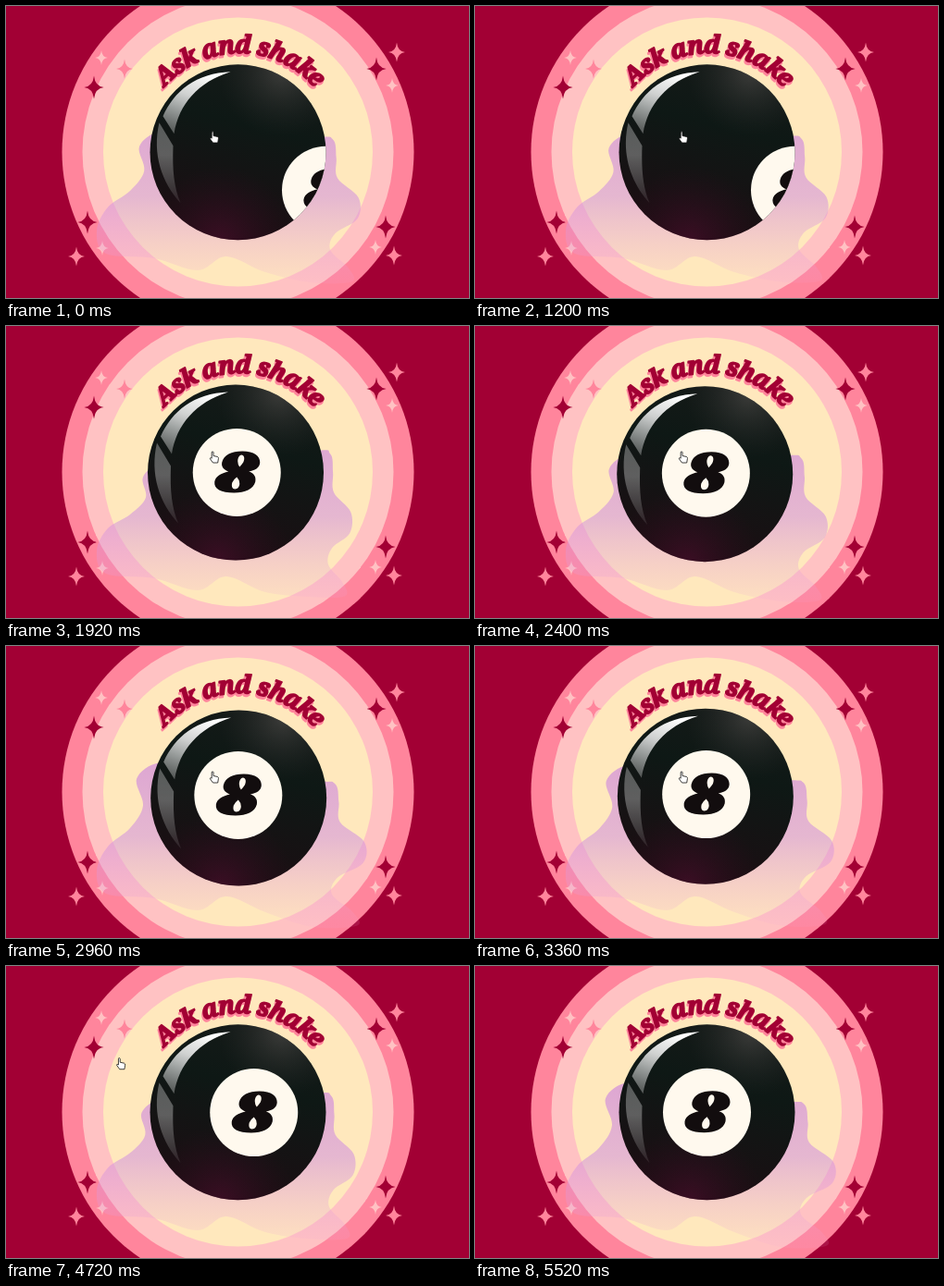
Recreate the animation shown at these times as an HTML page. Size 500x316 px, loop 5.6 s.

```html
<!DOCTYPE html>
<html lang="en">
<head>
<meta charset="utf-8">
<title>Ask and shake</title>
<style>
  html, body { margin: 0; width: 100%; height: 100%; overflow: hidden; background: #a20034; }
  svg { display: block; width: 500px; height: 316px; }
  .title { font: italic 900 27px "Noto Serif", serif; letter-spacing: -1.1px; text-anchor: middle; stroke-width: 1.7; stroke-linejoin: round; }
</style>
</head>
<body>
<svg viewBox="0 0 500 316">
  <defs>
    <linearGradient id="mist" gradientUnits="userSpaceOnUse" x1="0" y1="130" x2="0" y2="300">
      <stop stop-color="#cc84de" stop-opacity=".65"/>
      <stop offset=".45" stop-color="#d08fe0" stop-opacity=".55"/>
      <stop offset="1" stop-color="#f0a4d4" stop-opacity=".12"/>
    </linearGradient>
    <linearGradient id="body" x1=".65" y1="0" x2=".4" y2="1">
      <stop stop-color="#151a18"/><stop offset=".35" stop-color="#0e1815"/><stop offset="1" stop-color="#1c0d12"/>
    </linearGradient>
    <radialGradient id="glow" cx=".4" cy="1" r=".42">
      <stop stop-color="#5a0f36" stop-opacity=".5"/><stop offset="1" stop-color="#3a0c24" stop-opacity="0"/>
    </radialGradient>
    <radialGradient id="sheen" cx=".75" cy=".05" r=".36">
      <stop stop-color="#6a6461" stop-opacity=".45"/><stop offset="1" stop-color="#333" stop-opacity="0"/>
    </radialGradient>
    <linearGradient id="shineTop" x1=".6" y1="0" x2=".2" y2="1">
      <stop stop-color="#fff"/><stop offset=".4" stop-color="#fff" stop-opacity=".8"/><stop offset="1" stop-color="#fff" stop-opacity=".28"/>
    </linearGradient>
    <linearGradient id="shineLow" x1="0" y1="0" x2="0" y2="1">
      <stop stop-color="#fff" stop-opacity=".3"/><stop offset=".4" stop-color="#fff" stop-opacity=".32"/><stop offset="1" stop-color="#fff" stop-opacity=".08"/>
    </linearGradient>
    <clipPath id="ballClip"><circle r="95"/></clipPath>
    <path id="arc" d="M145 158A107 107 0 0 1 359 158"/>
  </defs>

  <circle cx="250.5" cy="158" r="190" fill="#ff859c"/>
  <circle cx="250.5" cy="158" r="168" fill="#ffc2c3"/>
  <circle cx="250.5" cy="158" r="145.5" fill="#ffe8bd"/>
  <g id="stars"></g>
  <path id="smoke" fill="url(#mist)"/>

  <g class="title">
    <text fill="#ff859c" stroke="#ff859c" transform="translate(-1 3)"><textPath href="#arc" startOffset="50%">Ask and shake</textPath></text>
    <text fill="#a20034" stroke="#a20034"><textPath href="#arc" startOffset="50%">Ask and shake</textPath></text>
  </g>

  <g id="ball">
    <circle r="95" fill="url(#body)"/>
    <circle r="95" fill="url(#glow)"/>
    <circle r="95" fill="url(#sheen)"/>
    <g clip-path="url(#ballClip)">
      <g id="eight">
        <circle r="47.5" fill="#fff9ee"/>
        <path fill="#120d0e" d="M6-23C19-23 25-18 25-11C25-5 19-2 13-1C19 1 21 5 20 10C18 18 9 22-3 22C-17 22-25 18-24 10C-23 4-17 1-9-1C-14-3-17-6-16-11C-14-19-6-23 6-23Z"/>
        <path fill="#fff9ee" d="M5-19C8-19 9-15 7-11Q5-8 3-6Q1-9 1-12C1-16 3-19 5-19ZM0 5Q3 8 3 12C3 15 1 18-2 18C-5 18-6 15-5 11Q-3 7 0 5Z"/>
      </g>
    </g>
    <path fill="url(#shineTop)" d="M-8-87C-45-86-69-66-81-39L-69-20C-64-52-43-76-8-87Z"/>
    <path fill="url(#shineLow)" d="M-85-32L-70-7C-71 20-69 38-62 55C-82 33-93 2-85-32Z"/>
  </g>

  <path id="hand" fill="#fff" stroke="#111" stroke-width=".8" stroke-linejoin="round"
    d="M-2.5-6C-1.7-6.4-1-6-1-5V-1.5L3.5-.5Q4.6 0 4.4 1.5L3.7 6H-1.5L-4.6 1.7Q-5 .5-3.3.8L-2.8 1.2V-5Z"/>
</svg>

<script>
const LOOP = 5600, TAU = 2 * Math.PI, $ = id => document.getElementById(id);
const clamp = x => Math.min(1, Math.max(0, x));
const ease = (t, from, to) => { const k = clamp((t - from) / (to - from)); return k * k * (3 - 2 * k); };
const move = (id, x, y) => $(id).setAttribute('transform', `translate(${x} ${y})`);

function addStars(color, r, places) {
  const w = r * .85, q = r * .09;
  $('stars').innerHTML += places.map(p => `<path fill="${color}" transform="translate(${p})"
    d="M0 ${-r}Q${q} ${-q} ${w} 0Q${q} ${q} 0 ${r}Q${-q} ${q} ${-w} 0Q${-q} ${-q} 0 ${-r}Z"/>`).join('');
}
addStars('#a20034', 12.5, [[95, 88], [400, 68], [88, 234], [410, 239]]);
addStars('#ff859c', 10.5, [[128, 68], [422, 50], [76, 271], [419, 270]]);
addStars('#ffc2c3', 8, [[103, 56], [417, 86], [104, 262], [399, 261]]);

// Smoke at its smallest
const outline = [[200, 150], [166, 150], [148, 164], [151, 186], [134, 204], [110, 219], [98, 243], [108, 268],
  [160, 273], [207, 286], [238, 271], [280, 288], [330, 293], [366, 292], [363, 277], [348, 258], [352, 240],
  [371, 224], [372, 201], [354, 180], [353, 158], [350, 138], [330, 135]];

// Swelling lifts the upper left and pushes the right side outwards and down
const swell = ([x, y], k) => [
  x - 7 * k * clamp((170 - x) / 20) * clamp((200 - y) / 30) + 15 * k * clamp((x - 340) / 30),
  y - 24 * k * clamp((250 - x) / 70) * clamp((225 - y) / 70) + 11 * k * clamp((x - 280) / 40)
];

function smokePath(k) {
  const p = outline.map(point => swell(point, k)), n = p.length, at = i => p[(i + n) % n];
  let d = 'M' + p[0];
  for (let i = 0; i < n; i++) {
    const [a, b, c, e] = [at(i - 1), at(i), at(i + 1), at(i + 2)];
    d += `C${b.map((v, j) => v + (c[j] - a[j]) / 6)} ${c.map((v, j) => v - (e[j] - b[j]) / 6)} ${c}`;
  }
  return d + 'Z';
}

function draw(t) {
  $('smoke').setAttribute('d', smokePath(.5 + .5 * Math.cos(TAU * (t - 570) / 2500)));

  const power = clamp((t - 1240) / 100) * clamp((3560 - t) / 100);
  const angle = 3.52 + TAU * (t - 1920) / 467;
  const dx = power * 2.7 * Math.cos(angle), dy = power * (-3.5 - 10 * Math.sin(angle));
  move('ball', 250.5 + dx, 158.3 + dy);

  // The number rolls aside on hover and returns for the shake
  const aside = 1 - ease(t, 1240, 1600) + ease(t, 3440, 3840) - ease(t, 3920, 5020);
  move('eight', 95 * aside - dx / 2, 41 * aside ** 3 - dy / 2);

  const x = 225 - 53 * ease(t, 3840, 4300) - 166 * ease(t, 4480, 5160);
  move('hand', x, 142 + (x - 225) * .36);
  $('hand').style.display = t < 5160 ? '' : 'none';
}

const start = performance.now();
(function tick() {
  draw((performance.now() - start) % LOOP);
  requestAnimationFrame(tick);
})();
</script>
</body>
</html>
```
